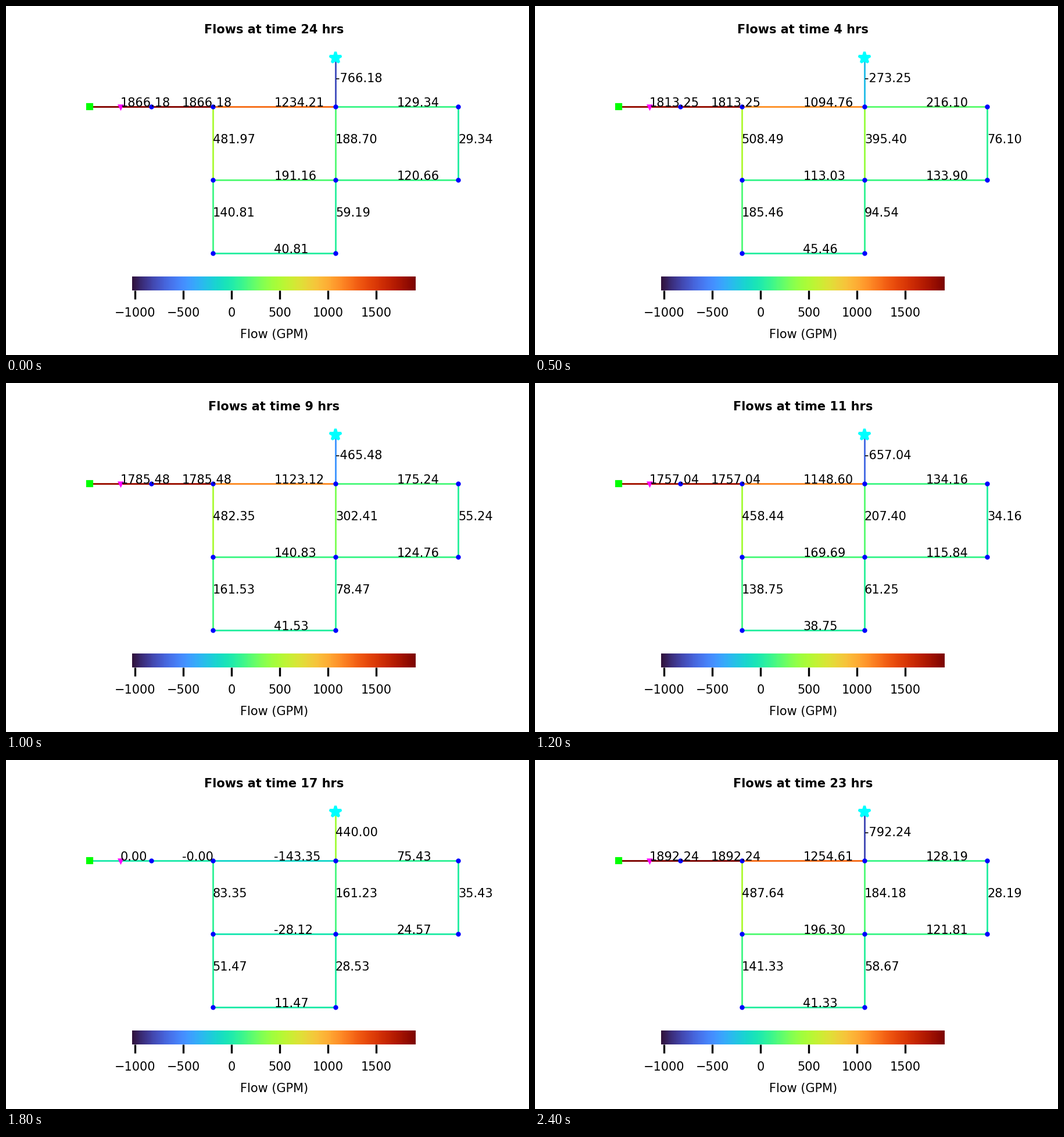
A matplotlib script for the animation above (2.5 s loop, 900 by 600 pixels).

```python
import numpy as np
import matplotlib.pyplot as plt
from matplotlib.animation import FuncAnimation
from matplotlib.cm import ScalarMappable
from matplotlib.colors import Normalize

HOURS = 25
GPM = 448.831                      # gallons per minute in one cubic foot per second
RESERVOIR_HEAD, TANK_BASE = 800.0, 850.0
TANK_AREA = np.pi * 50.5 ** 2 / 4
LEVEL_ON, LEVEL_OFF = 110.0, 140.0

# street grid of three rows, the last corner left out
grid = [(r, c) for r in (1, 2, 3) for c in (1, 2, 3) if r + c < 6]
place = {(r, c): (10 + 20 * c, 100 - 30 * r) for r, c in grid}
place.update(reservoir=(10, 70), outlet=(20, 70), tank=(50, 90))
junctions = ["outlet", *grid]
demands = np.array([0, 150, 150, 100, 150, 200, 150, 100, 100]) / GPM

# each grid node feeds its right and lower neighbours; sizes in inches
streets = [(node, after) for node in grid
           for after in ((node[0], node[1] + 1), (node[0] + 1, node[1]))
           if after in grid]
links = [("reservoir", "outlet"), ("outlet", (1, 1)), ("tank", (1, 2)), *streets]
PUMP, RISER = 0, 2
diameter = np.array([12, 18, 18, 14, 10, 10, 12, 8, 10, 8, 12, 6, 6]) / 12
length = np.full(len(links), 5280.0)
length[:3] = 0, 10530, 200

resistance = 4.727 * length / 100 ** 1.852 / diameter ** 4.871
incidence = np.array([[(n == a) - (n == b) for n in junctions]
                      for a, b in links], float)

PUMP_FLOW = 1500 / GPM
PUMP_HEAD = 250 * 4 / 3
PUMP_DROP = 250 / 3 / PUMP_FLOW ** 2


def demand_factor(t):
    """Triangle wave over 24 hours in two-hour steps, from 0.4 to 1.6."""
    return 1.6 - 0.2 * abs((t // 7200 + 3) % 12 - 6)


def solve(q, tank_head, demand, pump_on):
    """Newton iterations on link flows and junction heads together."""
    m, n = incidence.shape
    fixed = np.zeros(m)
    fixed[PUMP], fixed[RISER] = RESERVOIR_HEAD, tank_head
    for _ in range(40):
        slope = np.maximum(1.852 * resistance * np.abs(q) ** 0.852, 1e-7)
        loss = slope * q / 1.852
        if pump_on:
            slope[PUMP] = max(2 * PUMP_DROP * abs(q[PUMP]), 1e-7)
            loss[PUMP] = PUMP_DROP * q[PUMP] ** 2 - PUMP_HEAD
        else:
            slope[PUMP] = 1e8
            loss[PUMP] = 1e8 * q[PUMP]
        system = np.block([[np.diag(slope), -incidence],
                           [incidence.T, np.zeros((n, n))]])
        rhs = np.concatenate([slope * q - loss + fixed, -demand])
        new = np.linalg.solve(system, rhs)[:m]
        change = np.abs(new - q).sum() / np.abs(new).sum()
        q = new
        if change <= 0.001:
            break
    return q


def simulate():
    """Hourly link flows in GPM while the tank level switches the pump."""
    q = np.pi * diameter ** 2 / 4
    q[PUMP] = PUMP_FLOW
    t, level, inflow, pump_on, rows = 0, 120.0, 0.0, True, []
    while True:
        slack = abs(inflow) / TANK_AREA
        if pump_on and level >= LEVEL_OFF - slack:
            pump_on = False
        elif not pump_on and level <= LEVEL_ON + slack:
            pump_on = True
            q[PUMP] = PUMP_FLOW
        q = solve(q, TANK_BASE + level, demands * demand_factor(t), pump_on)
        if t % 3600 == 0:
            row = q * GPM
            if not pump_on:
                row[PUMP] = 0.0
            rows.append(row)
            if len(rows) == HOURS:
                return np.array(rows)
        inflow = -q[RISER]
        step = 3600 - t % 3600
        target = LEVEL_OFF if pump_on else LEVEL_ON
        switch = round((target - level) * TANK_AREA / inflow)
        if 0 < switch < step:
            step = switch
        level += inflow * step / TANK_AREA
        t += step


flows = simulate()
norm = Normalize(flows.min(), flows.max())
cmap = plt.get_cmap("turbo")

plt.rcParams.update({"font.family": "DejaVu Sans", "font.size": 5})
fig, ax = plt.subplots(figsize=(3, 2), dpi=300)
ax.axis("off")
ax.set_xlim(7, 73)
ax.set_ylim(6, 94)


def mark(pos, marker, color, size):
    ax.plot(*pos, marker, color=color, ms=size)


lines, labels = [], []
for a, b in links:
    ends = np.array([place[a], place[b]])
    lines += ax.plot(*ends.T, lw=0.7)
    labels.append(ax.text(*ends.mean(axis=0), "", fontsize=5))

for n in junctions:
    mark(place[n], "o", "blue", 1)
mark(place["reservoir"], "s", "lime", 2)
mark(place["tank"], "*", "cyan", 5)
mark(labels[PUMP].get_position(), "v", "fuchsia", 1)

bar = fig.colorbar(ScalarMappable(norm, cmap), ax=ax, orientation="horizontal",
                   shrink=0.7, pad=0.05, ticks=range(-1000, 1501, 500))
bar.outline.set_visible(False)
bar.ax.tick_params(labelsize=5)
bar.set_label("Flow (GPM)", fontsize=5)
title = ax.set_title("", fontsize=5, fontweight="bold")


def update(hour):
    # the caption runs one hour behind, wrapping to 24
    title.set_text(f"Flows at time {(hour - 1) % HOURS} hrs")
    for line, label, flow in zip(lines, labels, flows[hour]):
        line.set_color(cmap(norm(flow)))
        label.set_text(f"{flow:.2f}")
    return [title, *lines, *labels]


anim = FuncAnimation(fig, update, frames=HOURS, interval=100, repeat=True)
plt.show()
```
